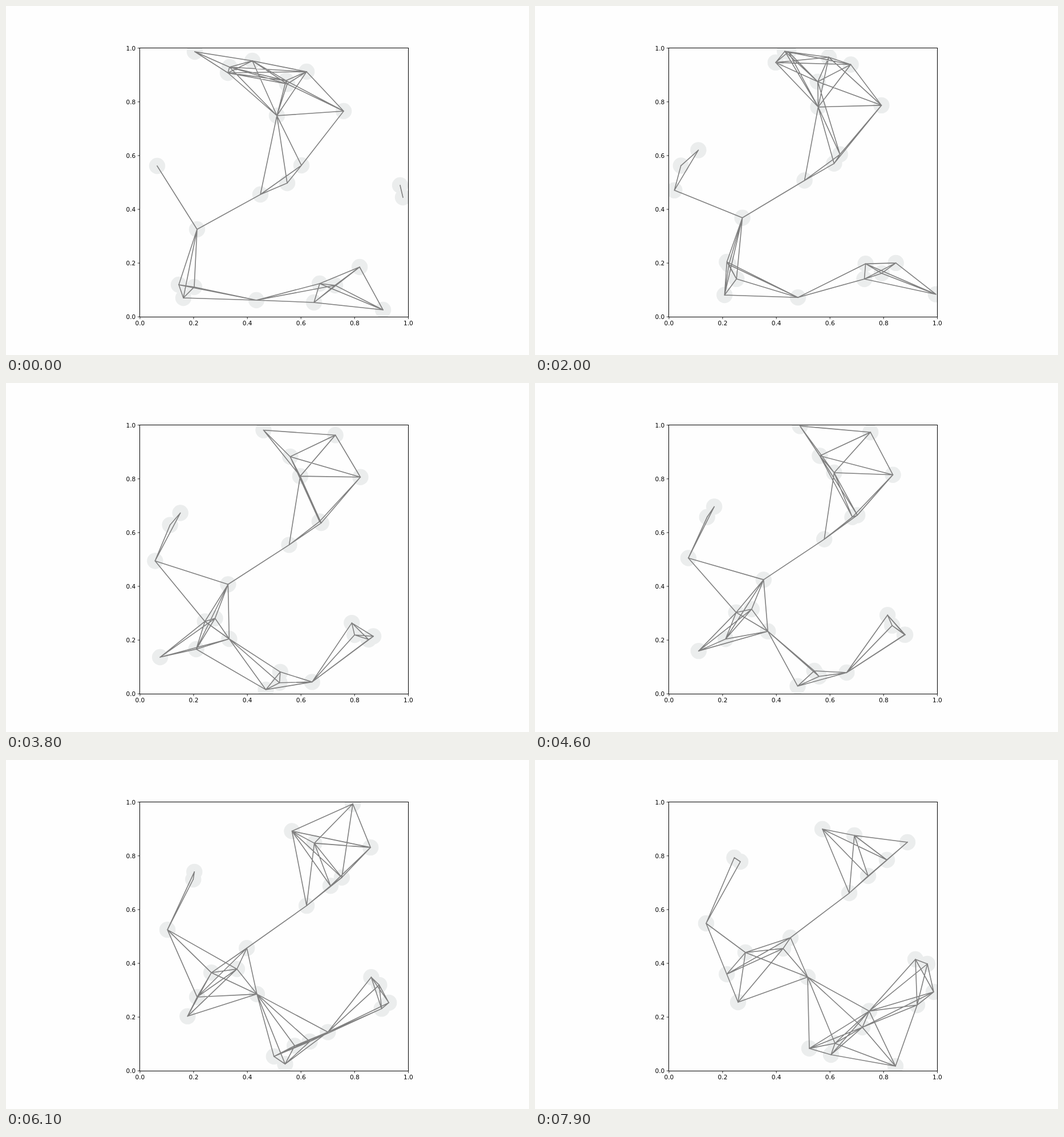
Write an HTML page that moves like this. It is 917 px wide and 611 px high and loops after 8000 ms.

```html
<!DOCTYPE html>
<html lang="en">
<head>
<meta charset="utf-8">
<title>Proximity graph</title>
<style>
  html, body { margin: 0; width: 100%; height: 100%; overflow: hidden; background: #fefefe; }
  svg { display: block; }
  text { font: 10.6px "DejaVu Sans", sans-serif; }
</style>
</head>
<body>
<svg width="917" height="611" viewBox="0 0 917 611">
  <clipPath id="plot"><rect x="234.7" y="73.3" width="470.5" height="470.5"/></clipPath>
  <g clip-path="url(#plot)" fill="none">
    <path id="nodes" stroke="#ebeded" stroke-width="28.4" stroke-linecap="round"/>
    <path id="edges" stroke="#808080" stroke-width="1.6" stroke-linecap="square"/>
  </g>
  <rect x="234.5" y="73.5" width="471" height="471" fill="none" stroke="#000"/>
  <g id="axes"></g>
</svg>
<script>
const LEFT = 234.73, TOP = 73.32, SIZE = 470.47;
const STEP_MS = 100, STEPS = 80, REACH = 0.3 * SIZE;

// Start x, y and the drift in x, y over the whole loop
const points = [
  [331, 80, 5.3, -175.5], [432, 96, 49, -61.5], [392, 107, 182, -109.5],
  [389, 117, 130, -71.5], [527, 115, 105, -49.5], [491, 130.6, 95, -161.5],
  [493, 136.5, 11, -15.5], [475, 192, 85, -60], [592, 184, 61, -40],
  [518, 279, 66, -76], [493, 310, 124, -135], [446, 330, 105, -97],
  [265, 280, 84.5, -109], [335, 391, 113, -80], [303, 488, 132, -158],
  [330, 492, 39, -155], [311, 511, 167, -131], [439, 515, 87, -19],
  [550, 486, 117, -137], [577, 489, 122, -83], [540, 519, 148, -162],
  [620, 457, 50, -28], [661, 532, 165.5, -108], [691, 314, 139.5, -136],
  [696, 335, 74.5, -49]
];

const byId = id => document.getElementById(id);
const wrap = (v, start) => start + ((v - start) % SIZE + SIZE) % SIZE;

function drawAxes() {
  let out = "";
  for (let i = 0; i <= 5; i++) {
    const x = LEFT + 0.2 + i * SIZE / 5, y = TOP + 0.4 + SIZE - i * SIZE / 5;
    const label = (i / 5).toFixed(1);
    out += `<path d="M${x} 544.5v3.7M234.5 ${y}h-3.7" stroke="#000" stroke-width=".85"/>
      <text x="${x}" y="559.4" text-anchor="middle">${label}</text>
      <text x="227.3" y="${y + 3.9}" text-anchor="end">${label}</text>`;
  }
  byId("axes").innerHTML = out;
}

function draw() {
  const step = Math.floor(performance.now() / STEP_MS) % STEPS;
  const part = step / (STEPS - 1);
  const now = points.map(([x, y, dx, dy]) =>
    [wrap(x + dx * part, LEFT), wrap(y + dy * part, TOP)]);
  let edges = "";
  now.forEach((a, i) => now.slice(i + 1).forEach(b => {
    if (Math.hypot(a[0] - b[0], a[1] - b[1]) < REACH) edges += `M${a}L${b}`;
  }));
  byId("nodes").setAttribute("d", now.map(p => `M${p}h0`).join(""));
  byId("edges").setAttribute("d", edges);
  requestAnimationFrame(draw);
}

drawAxes();
draw();
</script>
</body>
</html>
```
